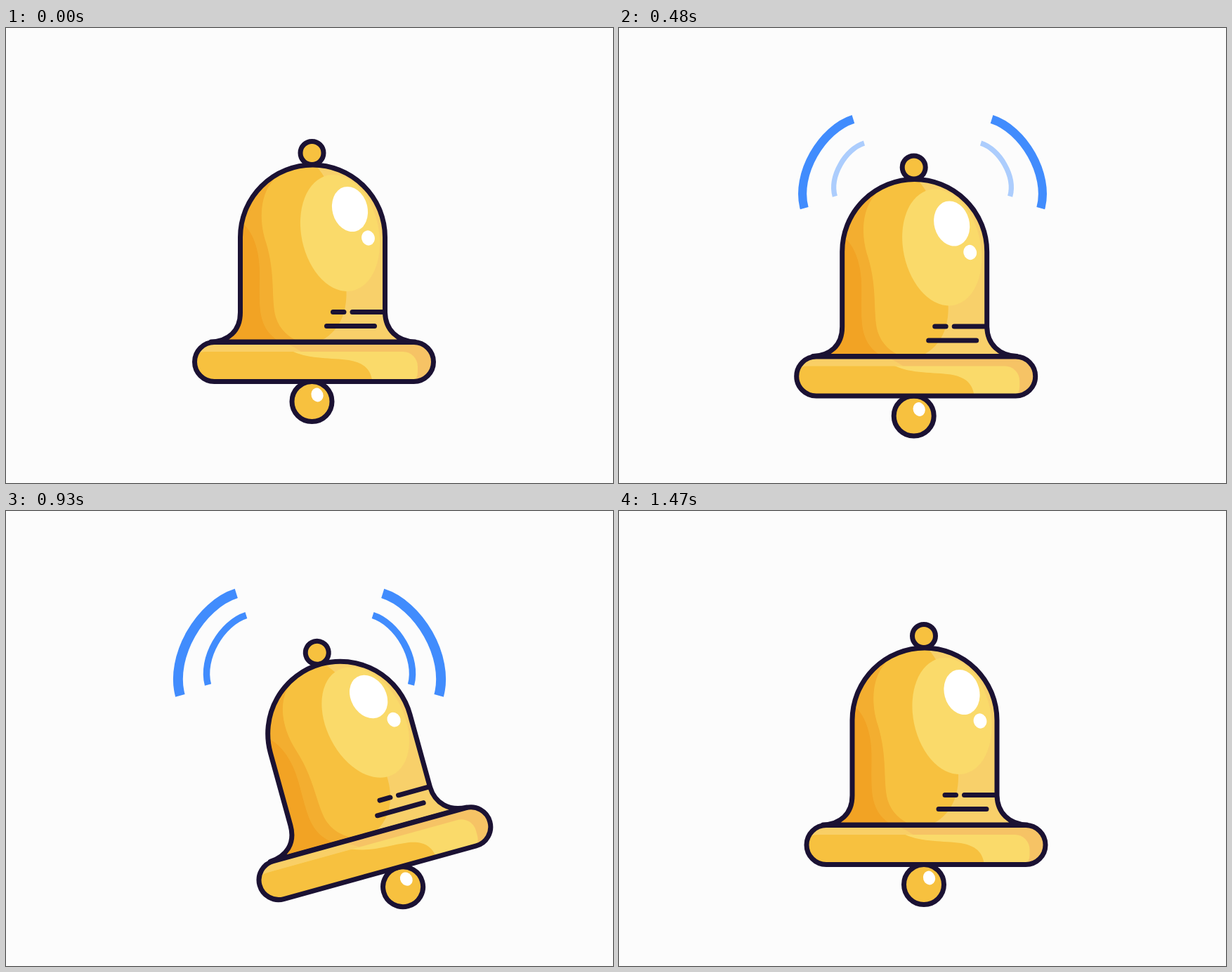
Recreate the animation shown at these times as an HTML page. Size 864 px wide and 648 px high, loop 1.83 s.

```html
<!DOCTYPE html>
<html lang="en">
<head>
<meta charset="utf-8">
<title>Ringing bell</title>
<style>
  html, body { margin: 0; width: 100%; height: 100%; overflow: hidden; background: #fcfcfc; }
  svg { display: block; width: 100%; height: 100%; }
  .line { fill: none; stroke: #1b1233; stroke-width: 7; stroke-linecap: round; stroke-linejoin: round; }
  .gold { fill: #f7c13f; }
  .pale { fill: #fada6a; }
  .wave { fill: none; stroke: #418cfd; stroke-width: 17; }
</style>
</head>
<body>
<svg viewBox="0 0 864 648">
  <defs>
    <path id="dome" d="M292 447C316 446 333.500 432 333.500 405V298A103 103 0 0 1 539.500 298V405C540 430 557 446 582 447Z"/>
    <rect id="rim" x="268.500" y="447.500" width="340" height="56" rx="28"/>
    <path id="arc" d="M-54-118.700C-116-99.300-170-9-151.500 58.800"/>
    <clipPath id="domeClip"><use href="#dome"/></clipPath>
    <clipPath id="rimClip"><use href="#rim"/></clipPath>
    <clipPath id="pillClip"><rect x="262" y="461" width="324" height="50" rx="21"/></clipPath>
  </defs>

  <g id="waves"></g>

  <g id="bell">
    <g id="clapper">
      <circle class="gold" cx="435.500" cy="532" r="28.500"/>
      <circle class="line" cx="435.500" cy="532" r="28.500"/>
      <ellipse cx="443" cy="522.500" rx="8.500" ry="10" fill="#fff" transform="rotate(-18 443 522.500)"/>
    </g>

    <circle class="gold" cx="435.500" cy="178" r="16.500"/>
    <circle class="line" cx="435.500" cy="178" r="16.500"/>

    <g clip-path="url(#domeClip)">
      <rect x="280" y="185" width="310" height="270" fill="#f8d06a"/>
      <path class="gold" d="M280 185H425C470 205 485 300 484.500 380C484 412 470 440 436 450H280Z"/>
      <path fill="#f3ae30" d="M280 185H400L385 212C360 235 360 275 370 305C384 350 377 385 384 412C391 433 406 443 425 450H280Z"/>
      <path fill="#f2a324" d="M280 275H333C352 288 361 318 361 347C361 390 359 408 370 428C377 439 385 444 394 450H280Z"/>
      <ellipse class="pale" cx="475.500" cy="292" rx="55" ry="84" transform="rotate(-12 475.500 292)"/>
    </g>
    <ellipse cx="489.500" cy="258" rx="25" ry="32.500" fill="#fff" transform="rotate(-15 489.500 258)"/>
    <ellipse cx="515.500" cy="299" rx="9.300" ry="10.700" fill="#fff" transform="rotate(-15 515.500 299)"/>
    <use href="#dome" class="line"/>
    <path class="line" d="M465.500 404.500H481M493 404.500H539M456.500 424.500H524.500"/>

    <g clip-path="url(#rimClip)">
      <rect x="265" y="444" width="347" height="63" fill="#f6c365"/>
      <path fill="#f9cf66" d="M265 444H385Q410 452 425 465H265Z"/>
      <g clip-path="url(#pillClip)">
        <rect class="pale" x="262" y="455" width="330" height="55"/>
        <path class="gold" d="M262 455H398C425 473 460 469 488 473C510 477 521 486 522 510H262Z"/>
      </g>
    </g>
    <use href="#rim" class="line"/>
  </g>
</svg>
<script>
  const LOOP = 1830, STEP = 30;
  const WAVE_STARTS = [0, 330, 630];

  // Keys are [ms, value]
  const X = [[0, 0], [240, -22.5], [480, -15.8], [660, -4.5], [810, 5.5], [1050, 6.5], [1320, -1.5]];
  const Y = [[0, 0], [240, 9], [480, 20.5], [660, 25], [810, 29], [850, 29.3], [1050, 15], [1320, 0]];
  const TILT = [[0, 0], [110, 16.3], [240, 0], [355, -17.5], [480, 0], [590, 13.5], [660, 9.1],
                [810, 0], [940, -16], [1050, -9.7], [1290, 0]];
  const CLAPPER = [[0, 0], [135, -40], [240, -6], [375, 40], [480, 0], [605, -42], [660, -37.5],
                   [810, -12.3], [960, 36], [1050, 26], [1290, 0]];

  const clamp = v => Math.min(1, Math.max(0, v));

  function slope(keys, i) {
    if (i === 0 || i === keys.length - 1) return 0;
    const [a, b] = [keys[i - 1], keys[i + 1]];
    return (b[1] - a[1]) / (b[0] - a[0]);
  }

  // Cubic Hermite curve through the keys
  function curve(keys, t) {
    const i = keys.findIndex(k => k[0] > t) - 1;
    if (i < 0) return keys[keys.length - 1][1];
    const [t0, a] = keys[i], [t1, b] = keys[i + 1];
    const d = t1 - t0, u = (t - t0) / d, v = 1 - u;
    return a * v * v * (1 + 2 * u) + b * u * u * (3 - 2 * u)
      + d * u * v * (slope(keys, i) * v - slope(keys, i + 1) * u);
  }

  const waves = document.getElementById('waves');
  const bell = document.getElementById('bell');
  const clapper = document.getElementById('clapper');

  const rings = WAVE_STARTS.map(start => {
    const sides = [1, -1].map(side => {
      const node = document.createElementNS('http://www.w3.org/2000/svg', 'use');
      node.setAttribute('href', '#arc');
      node.setAttribute('class', 'wave');
      waves.append(node);
      return { node, side };
    });
    return { start, sides };
  });

  function draw(t) {
    bell.setAttribute('transform',
      `translate(${curve(X, t)} ${curve(Y, t)}) rotate(${curve(TILT, t)} 435.5 178)`);
    clapper.setAttribute('transform', `translate(${curve(CLAPPER, t)} 0)`);

    for (const { start, sides } of rings) {
      const age = t - start;
      const size = Math.max(0, 0.296 + age * 0.000872);
      const alpha = Math.min(clamp((age - 63) / 204), clamp((838 - age) / 204));
      for (const { node, side } of sides) {
        node.setAttribute('transform',
          `translate(${432 - 60 * side} 214.7) scale(${size * side} ${size})`);
        node.setAttribute('opacity', alpha);
      }
    }
  }

  const begin = performance.now();
  function tick() {
    const t = (performance.now() - begin) % LOOP;
    draw(Math.floor(t / STEP) * STEP);
    requestAnimationFrame(tick);
  }
  tick();
</script>
</body>
</html>
```
